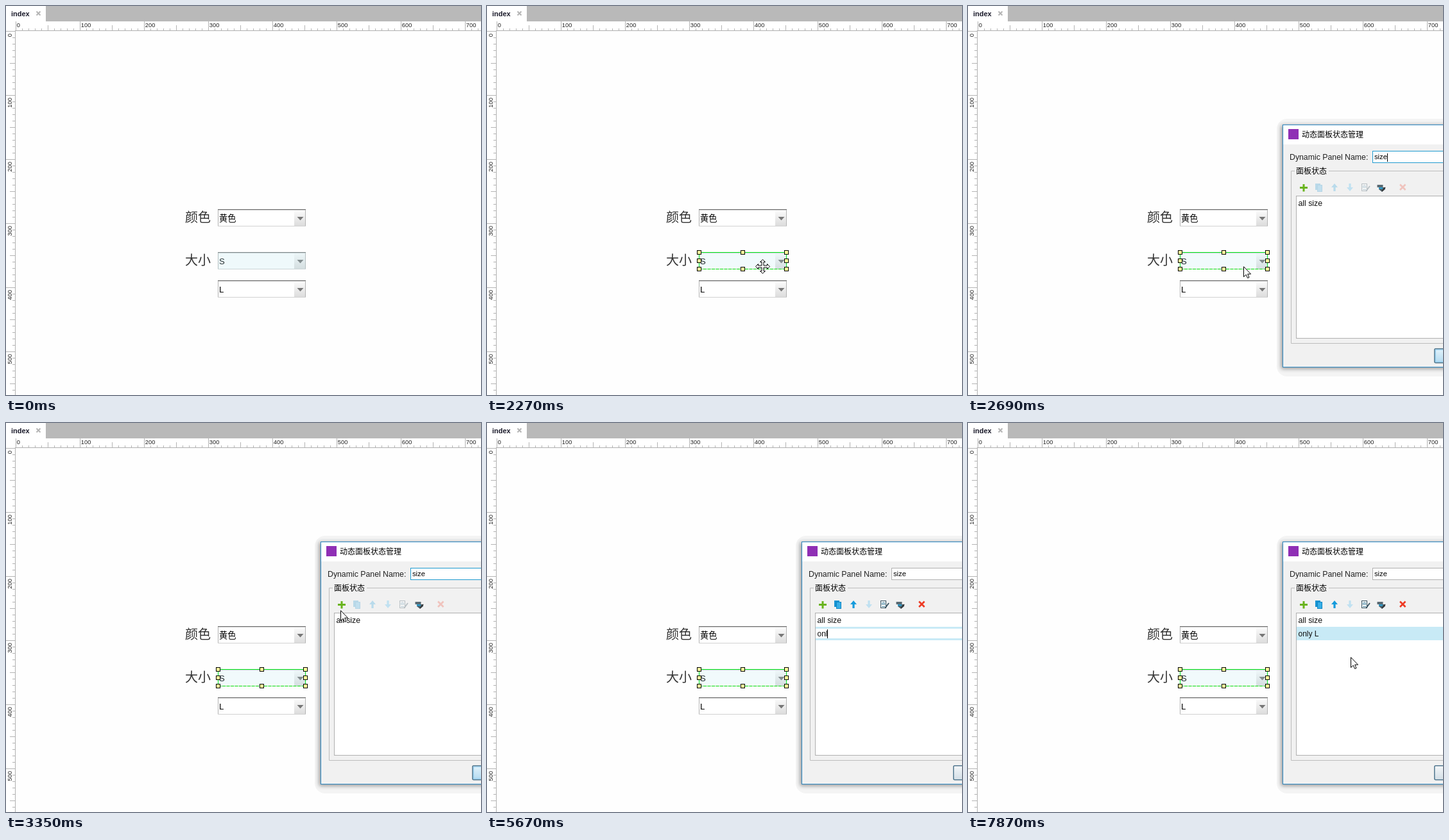
An HTML page that plays this animation: 740 px wide and 607 px high, repeating every 7990 ms.

```html
<!DOCTYPE html>
<html lang="zh">
<head>
<meta charset="utf-8">
<title>Panel states</title>
<style>
html, body { margin: 0; width: 100%; height: 100%; overflow: hidden; background: #fefefe; }
svg { display: block; width: 740px; height: 607px; }
text { font-family: "Liberation Sans", "Noto Sans CJK SC", "Noto Sans CJK", sans-serif; white-space: pre; }
</style>
</head>
<body>
<svg id="stage" viewBox="0 0 740 607" xmlns="http://www.w3.org/2000/svg"></svg>
<script>
const LOOP = 7990;
const stage = document.getElementById('stage');

const rect = (x, y, w, h, fill, extra = '') =>
  `<rect x="${x}" y="${y}" width="${w}" height="${h}" fill="${fill}" ${extra}/>`;
const path = (d, fill, extra = '') => `<path d="${d}" fill="${fill}" ${extra}/>`;
const line = (d, color, extra = '') => path(d, 'none', `stroke="${color}" ${extra}`);
const text = (x, y, size, str, fill = '#000', extra = '') =>
  `<text x="${x}" y="${y}" font-size="${size}" fill="${fill}" ${extra}>${str}</text>`;
const group = (id, body, extra = '') => `<g id="${id}" ${extra}>${body}</g>`;
const grad = (id, a, b) =>
  `<linearGradient id="${id}" x2="0" y2="1"><stop stop-color="${a}"/><stop offset="1" stop-color="${b}"/></linearGradient>`;

function rulers() {
  let top = '', side = '', labels = '';
  for (let i = 0; i < 73; i++) {
    const x = 15.5 + i * 10, y = 39.5 + i * 10;
    const big = i % 10 === 0, mid = i % 5 === 0;
    top += `M${x} ${big ? 24 : mid ? 30 : 35}V38`;
    if (y < 607) side += `M${big ? 0 : mid ? 6 : 10} ${y}H14`;
    if (big) {
      labels += text(x + 1.3, 33, 9.3, i * 10, '#222');
      if (y < 600) labels += text(0, 0, 9.3, i * 10, '#222',
        `text-anchor="end" transform="translate(9 ${y + 3.7}) rotate(-90)"`);
    }
  }
  return rect(0, 24, 740, 15, '#fff') + rect(0, 24, 15, 583, '#fff') +
    line(top + side, '#b4b4b4') + line('M14 38.5H740M14.5 38V607', '#b0b0b0') + labels;
}

function select(y, label) {
  return rect(330, y, 137, 27, '#fff') +
    rect(449, y + 2, 17, 24, 'url(#drop)') +
    line(`M330.5 ${y}V${y + 27}M466.5 ${y}V${y + 27}`, '#b3b3b3') +
    line(`M330 ${y + 26.5}H467`, '#d2d2d2') +
    line(`M330 ${y + .5}H467`, '#6f6f6f') + line(`M331 ${y + 1.5}H466`, '#cfcfcf') +
    path(`M453.5 ${y + 12}H463.5L458.5 ${y + 17.5}Z`, '#777') +
    text(332, y + 19, 13.2, label);
}

function handles() {
  let out = '';
  for (const x of [330.5, 398.5, 466.5])
    for (const y of [384.5, 397.5, 410.5])
      if (x !== 398.5 || y !== 397.5)
        out += rect(x - 3, y - 3, 6, 6, '#ffff9c', 'stroke="#000"');
  return out;
}

const arrowUp = 'M571 277L576 283H572.6V289H569.4V283H566Z';
const copyIcon =
  rect(541, 277, 8, 10, '#1593d2') +
  rect(544.5, 279.5, 7, 10, '#37aee6', 'stroke="#0f86c4"');
const editIcon =
  rect(613.5, 277.5, 8, 11, '#fff', 'stroke="#35505e"') +
  line('M615.5 280V284M617.5 279V284M619.5 280V284M615 286.5H620', '#3f7f9c') +
  line('M620 289L626 281', '#35505e', 'stroke-width="1.8"');
const signIcon =
  rect(637.5, 279, 9, 4, '#5a6a72') + path('M640 283H650V286L645 290L640 286Z', '#4d5d66') +
  rect(640, 283, 6, 2.5, '#2c9ccb') + line('M645 289L650 283', '#333', 'stroke-width="1.5"');

function dialogBody() {
  return rect(490.5, 185.5, 300, 378, '#f1f1f1', 'stroke="#2a86c0"') +
    rect(491, 186, 260, 30, '#fff') +
    rect(499, 192, 16, 16, '#8f2fb5') +
    text(520, 205, 12, '动态面板状态管理') +
    text(501, 240, 12.3, 'Dynamic Panel Name:', '#222') +
    rect(630.5, 226.5, 160, 18, '#fff', 'id="field"') +
    text(633, 239, 11.2, 'size') +
    rect(653, 230, 1, 13, '#000', 'id="nameCaret"') +
    line('M509 257.5H503.5V526.5H760M562 257.5H760', '#bdbdbd') +
    text(511, 262, 12, '面板状态') +
    path('M521.5 278H524.5V282H529V285H524.5V289.5H521.5V285H517V282H521.5Z', '#69b41e') +
    group('tools', copyIcon + path(arrowUp, '#169bdc')) +
    path(arrowUp, '#c0e1f1', 'transform="rotate(180 583 283)"') +
    group('edit', editIcon) + signIcon +
    line('M673 278.5L681.5 287M681.5 278.5L673 287', '#ee3a24', 'id="del" stroke-width="2.6"') +
    rect(511.5, 296.5, 280, 222, '#fff', 'stroke="#b0b0b0"') +
    text(514.5, 312, 12.3, 'all size', '#111') +
    group('row',
      rect(512, 318, 240, 21, '#c8eaf6') +
      rect(512, 321, 240, 15, '#fff', 'id="editor"') +
      rect(514, 322, 35, 14, '#93c9f2', 'id="marked"') +
      `<text id="rowText" x="514.5" y="333" font-size="12" fill="#111"></text>` +
      rect(546, 322, 1, 14, '#000', 'id="caret"')) +
    rect(726.75, 534.75, 60, 22, 'url(#ok)', 'id="button" stroke="#52788f" stroke-width="1.5" rx="2"') +
    rect(728.5, 536.5, 57, 18.5, 'none', 'id="glow" stroke="#8fcdf0"');
}

const fourWay = 'M0 -11L4 -7H1.5V-1.5H7V-4L11 0L7 4V1.5H1.5V7H4L0 11L-4 7H-1.5V1.5H-7V4L-11 0L-7 -4V-1.5H-1.5V-7H-4Z';

stage.innerHTML =
  '<defs>' + grad('drop', '#fbfbfb', '#dcdcdc') + grad('ok', '#e3f3fc', '#b3daf0') +
  grad('okPale', '#f4f7f9', '#d3dee6') +
  '<filter id="soft" x="-10%" y="-10%" width="120%" height="120%"><feGaussianBlur stdDeviation="3"/></filter></defs>' +
  rect(0, 0, 740, 607, '#fefefe') +
  rect(0, 0, 740, 24, '#b9b9b9') + rect(0, 0, 62, 24, '#fff') +
  text(8, 16, 11, 'index', '#1a1a2a', 'font-weight="bold"') +
  line('M47.5 8.5L53.5 14.5M53.5 8.5L47.5 14.5', '#b5b5b5', 'stroke-width="2"') +
  rulers() +
  text(279, 337, 20, '颜色', '#333') + text(279, 404, 20, '大小', '#333') +
  select(317, '黄色') + select(384, 'S') + select(428, 'L') +
  rect(330, 384, 137, 27, '#b4e1ed', 'id="tint" opacity=".22"') +
  group('selection',
    line('M330.5 410.5H466.5', '#00e000', 'stroke-dasharray="5 1.5"') +
    line('M330.5 410V384.5H466.5V410', '#00e818') + handles()) +
  group('dialog',
    rect(486, 182, 300, 391, '#e6e6e6', 'id="earlyShade" rx="14"') +
    group('shade',
      rect(481, 176, 300, 402, '#f4f4f4', 'rx="16"') +
      rect(488, 186, 300, 380, '#000', 'opacity=".4" filter="url(#soft)"')) +
    group('window', dialogBody())) +
  group('arrow', path('M.5 .7V16.6L4.2 13.2L6.6 18.5L9 17.5L6.7 12.2H11.6Z', '#fff', 'stroke="#000"')) +
  group('move', path(fourWay, '#fff', 'stroke="#000"')) +
  group('ibeam', line('M-3 -7.5H-1L0 -6.5L1 -7.5H3M0 -6.5V7M-3 8H-1L0 7L1 8H3', '#000', 'stroke-width="1.2"'));

const el = {};
stage.querySelectorAll('[id]').forEach(n => el[n.id] = n);

// Each entry holds until the next: [start, kind, x, y]
const pointer = [
  [0, ''], [400, 'arrow', 407, 511], [560, 'arrow', 421, 446], [690, 'arrow', 429, 396],
  [830, 'move', 429.5, 406.5], [2420, 'arrow', 429, 406], [2850, 'arrow', 429, 401],
  [2990, 'arrow', 450, 375], [3110, 'arrow', 480, 340], [3230, 'arrow', 506, 311],
  [3350, 'arrow', 521, 292], [3470, 'arrow', 520, 286], [3620, 'arrow', 519, 286],
  [4160, 'ibeam', 551.5, 331], [4310, 'ibeam', 561.5, 333], [5100, ''],
  [7210, 'arrow', 601, 367], [7750, 'arrow', 599, 374], [7870, 'arrow', 596, 365]
];
// [start, text, caret x]
const typing = [
  [0, '', 0], [3890, 'State1', 0], [5250, 'on', 528], [5670, 'onl', 530], [5800, 'only', 536],
  [6060, 'only ', 539], [6640, 'only L', 546], [7210, 'only L', 0], [7610, 'only L', 546], [7750, 'only L', 0]
];
// [start, button highlighted]
const pulse = [[0, 1], [4550, 0], [4790, 1], [5670, 0], [5800, 1], [6480, 0], [6640, 1], [7750, 0]];

const at = (list, t) => list.reduce((cur, k) => k[0] <= t ? k : cur);
const show = (name, on) => el[name].setAttribute('display', on ? 'inline' : 'none');

function draw(t) {
  const [, kind, x, y] = at(pointer, t);
  for (const name of ['arrow', 'move', 'ibeam']) {
    show(name, kind === name);
    if (kind === name) el[name].setAttribute('transform', `translate(${x} ${y})`);
  }
  show('selection', t >= 2270);
  el.tint.setAttribute('opacity', t < 2270 ? .22 : .19);

  const opening = t < 2690, added = t >= 3890;
  show('dialog', t >= 2570);
  show('earlyShade', opening);
  show('shade', !opening);
  el.window.setAttribute('opacity', opening ? .78 : 1);
  el.window.setAttribute('transform', opening ? 'translate(680 374) scale(.995) translate(-680 -374)' : '');
  el.field.setAttribute('stroke', added ? '#b0b0b0' : '#1f9bd0');
  show('nameCaret', t < 3110);
  el.tools.setAttribute('opacity', added ? 1 : .25);
  el.edit.setAttribute('opacity', added ? 1 : .3);
  el.del.setAttribute('opacity', added ? 1 : .25);

  const [, str, caret] = at(typing, t);
  show('row', added);
  show('editor', t < 7750);
  show('marked', t < 5250);
  show('caret', caret > 0);
  el.caret.setAttribute('x', caret);
  if (el.rowText.textContent !== str) el.rowText.textContent = str;

  const lit = at(pulse, t)[1];
  el.button.setAttribute('fill', lit ? 'url(#ok)' : 'url(#okPale)');
  show('glow', lit);
}

const start = performance.now();
function tick() {
  draw((performance.now() - start) % LOOP);
  requestAnimationFrame(tick);
}
draw(0);
requestAnimationFrame(tick);
</script>
</body>
</html>
```
